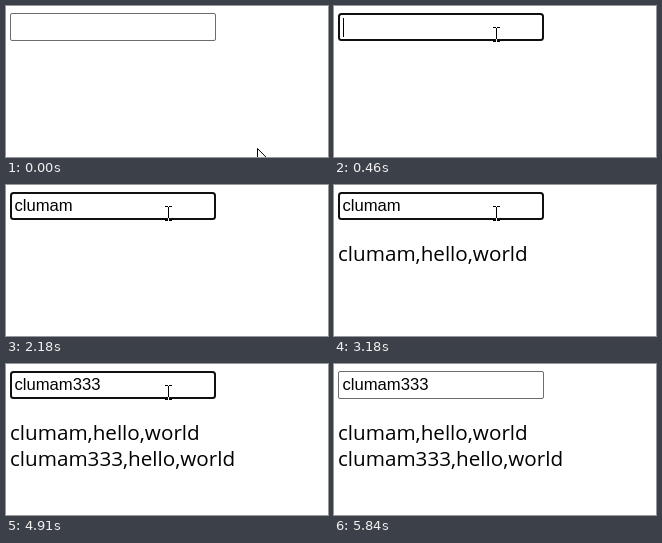
Animation, 322 px wide and 151 px high, one loop 5910 ms. Source, as an HTML page:

```html
<!DOCTYPE html>
<html lang="en">
<head>
<meta charset="utf-8">
<title>Input log</title>
<style>
  html, body { margin: 0; width: 100%; height: 100%; overflow: hidden; background: #fff; }
  svg { display: block; width: 322px; height: 151px; background: #fff; }
  text { fill: #000; white-space: pre; }
  #field { font: 16.67px "Liberation Sans", Arial, sans-serif; }
  .line { font: 20.65px "Open Sans", "Noto Sans", sans-serif; }
  #beam { mix-blend-mode: difference; }
</style>
</head>
<body>
<svg viewBox="0 0 322 151">
  <rect width="322" height="151" fill="#fff"/>
  <rect id="idle" x="4.5" y="7.5" width="205" height="27" rx="1.5" fill="#fff" stroke="#6b6b70"/>
  <rect id="focus" x="5" y="8" width="204" height="26" rx="2.5" fill="#fff" stroke="#101010" stroke-width="2"/>
  <text id="field" x="8.4" y="26"></text>
  <rect id="caret" width="1" height="19"/>
  <text class="line" x="4" y="76"></text>
  <text class="line" x="4" y="102"></text>
  <path id="arrow" d="M.5 .5V16.5L4.2 13L6.8 18.7L9.2 17.6L6.7 12H11.8Z" fill="#fff" stroke="#000"/>
  <path id="beam" d="M-3 -6.5H0M1 -6.5H4M.5 -6V7M-3 7.5H0M1 7.5H4" fill="none" stroke="#fff"/>
</svg>
<script>
  const LOOP = 5910;
  const NAME = "clumam";
  const $ = (id) => document.getElementById(id);
  const lines = document.querySelectorAll(".line");

  // [time, typed text, caret x]
  const typing = [
    [0, "", 9],
    [1090, NAME.slice(0, 1), 16],
    [1160, NAME.slice(0, 2), 20],
    [1410, NAME.slice(0, 3), 29],
    [1480, NAME.slice(0, 4), 43],
    [1560, NAME.slice(0, 5), 52],
    [1630, NAME, 66],
    [3580, NAME + "3", 76],
    [3730, NAME + "33", 85],
    [3900, NAME + "333", 94]
  ];

  // [time, visible]
  const blink = [
    [0, false], [460, true], [920, false], [1090, true], [2180, false],
    [2720, true], [3180, false], [3580, true], [4430, false],
    [4980, true], [5510, false]
  ];

  // [time, shape, x, y]
  const pointer = [
    [0, "arrow", 251, 142],
    [70, "arrow", 243, 124],
    [150, "arrow", 222, 88],
    [230, "arrow", 195, 55],
    [310, "beam", 170, 32],
    [390, "beam", 162, 28],
    [5210, "beam", 166, 30],
    [5290, "arrow", 184, 46],
    [5360, "arrow", 212, 70],
    [5430, "arrow", 245, 97],
    [5510, "arrow", 279, 122],
    [5590, "arrow", 307, 143],
    [5670, "none", 0, 0]
  ];

  const at = (steps, t) => steps.findLast((step) => step[0] <= t);
  const show = (el, on) => el.setAttribute("visibility", on ? "visible" : "hidden");

  function render(t) {
    const focused = t >= 460 && t < 5840;
    show($("idle"), !focused);
    show($("focus"), focused);

    const [, text, caretX] = at(typing, t);
    $("field").textContent = text;
    $("caret").setAttribute("x", caretX);
    $("caret").setAttribute("y", text ? 11 : 12);
    show($("caret"), at(blink, t)[1]);

    lines[0].textContent = t >= 2640 ? NAME + ",hello,world" : "";
    lines[1].textContent = t >= 4910 ? NAME + "333,hello,world" : "";

    const [, shape, x, y] = at(pointer, t);
    for (const id of ["arrow", "beam"]) {
      show($(id), id === shape);
      $(id).setAttribute("transform", `translate(${x} ${y})`);
    }
  }

  const start = performance.now();
  function tick() {
    render((performance.now() - start) % LOOP);
    requestAnimationFrame(tick);
  }
  tick();
</script>
</body>
</html>
```
